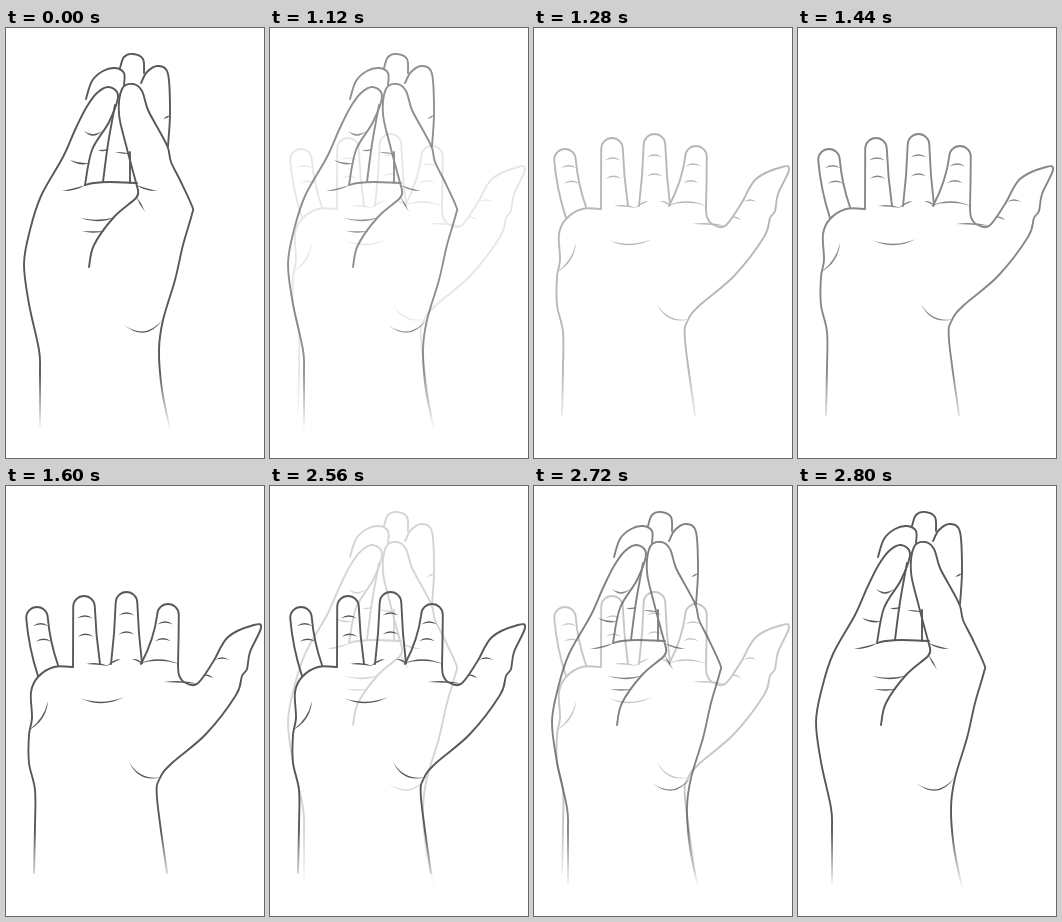
An HTML page for the animation above (2.88 s loop, 258 by 430 pixels).

```html
<!DOCTYPE html>
<html lang="en">
<head>
<meta charset="utf-8">
<title>Hand opening and closing</title>
<style>
  html, body { margin: 0; width: 100%; height: 100%; overflow: hidden; background: #fff; }
  svg { display: block; width: 100%; height: 100%; }
  .line { fill: none; stroke: url(#ink); stroke-width: 1.9; stroke-linecap: round; stroke-linejoin: round; }
  .crease { fill: #58585a; }
</style>
</head>
<body>
<svg viewBox="0 0 258 430">
  <linearGradient id="ink" gradientUnits="userSpaceOnUse" x1="0" y1="345" x2="0" y2="402">
    <stop stop-color="#58585a"/>
    <stop offset="1" stop-color="#58585a" stop-opacity="0"/>
  </linearGradient>
  <g id="closed"></g>
  <g id="open"></g>
</svg>
<script>
const LOOP = 2880, STEP = 80;
const OPENING = 1120, OPENING_STEPS = 7;
const CLOSING = 2560, CLOSING_STEPS = 4;

const closed = document.getElementById('closed');
const open = document.getElementById('open');

function addPath(hand, className, d) {
  const path = document.createElementNS('http://www.w3.org/2000/svg', 'path');
  path.setAttribute('class', className);
  path.setAttribute('d', d);
  hand.append(path);
}

// Smooth curve through a few key points
function curve(hand, text) {
  const p = text.split(' ').map(pair => pair.split(',').map(Number));
  let d = `M${p[0]}`;
  for (let i = 0; i < p.length - 1; i++) {
    const a = p[i - 1] || p[i], b = p[i], c = p[i + 1], e = p[i + 2] || c;
    const leave = b.map((v, k) => v + (c[k] - a[k]) / 6);
    const arrive = c.map((v, k) => v - (e[k] - b[k]) / 6);
    d += `C${leave} ${arrive} ${c}`;
  }
  addPath(hand, 'line', d);
}

// Skin fold, pointed at both ends; a positive bow sags downwards
function crease(hand, x0, y0, x1, y1, bow) {
  const length = Math.hypot(x1 - x0, y1 - y0);
  const nx = (y0 - y1) / length, ny = (x1 - x0) / length;
  const middle = offset => `${(x0 + x1) / 2 + nx * offset},${(y0 + y1) / 2 + ny * offset}`;
  addPath(hand, 'crease',
    `M${x0},${y0}Q${middle(2 * bow + 1.5)} ${x1},${y1}Q${middle(2 * bow - 1.5)} ${x0},${y0}Z`);
}

// Upright finger: round tip, sides spreading to the base, two folds
function finger(hand, tipX, tipY, leftX, leftY, rightX, rightY) {
  const r = 10.8, sideY = tipY + r;
  const bend = (side, baseX, baseY) => `${side + (baseX - side) * .2},${(sideY + baseY) / 2}`;
  const left = tipX - r, right = tipX + r;
  addPath(hand, 'line',
    `M${leftX},${leftY}Q${bend(left, leftX, leftY)} ${left},${sideY}` +
    `A${r},${r} 0 0 1 ${right},${sideY}Q${bend(right, rightX, rightY)} ${rightX},${rightY}`);
  for (const part of [.33, .6]) {
    const x = tipX + ((leftX + rightX) / 2 - tipX) * part;
    const y = tipY + (rightY - tipY) * part;
    crease(hand, x - 8, y, x + 8, y, -2.5);
  }
}

function drawClosedHand() {
  const line = points => curve(closed, points);
  const fold = (...shape) => crease(closed, ...shape);

  // Near finger and left side of the palm
  line('34,399 34,345 33,322 23,276 18,236 24,202 35,168 57,129 69,102 80,80 91,65 103,59 112,68 103,94 86,122 79,157');
  // Fingers behind
  line('80,71 86,53 97,43 109,40 118,45 118,57');
  line('109,77 102,116 97,154');
  line('114,40 118,29 127,26 137,31 138,45');
  line('135,55 141,44 152,38 162,46 164,85 162,118');
  // Thumb and right side of the wrist
  line('132,162 120,117 113,86 116,61 127,56 136,63 142,82 154,104 162,120 165,134 174,152 186,178 186,186 177,217 169,252 157,292 153,322 156,362 164,401');
  line('124,124 124,155');
  // Palm
  line('79,157 88,155 104,154 131,155');
  line('132,162 130,170 108,189 88,217 83,239');

  fold(56, 163, 80, 157, 1);
  fold(130, 157, 151, 163, 1);
  fold(130, 168, 139, 184, 0);
  fold(78, 103, 96, 103, 4);
  fold(64, 132, 85, 135, 2);
  fold(92, 122, 103, 121, 1);
  fold(109, 124, 125, 126, 0);
  fold(157, 91, 165, 87, 0);
  fold(74, 190, 110, 189, 3);
  fold(76, 203, 99, 203, 1);
  fold(118, 297, 157, 291, 10);
}

function drawOpenHand() {
  const line = points => curve(open, points);
  const fold = (...shape) => crease(open, ...shape);

  finger(open, 31, 121, 32, 190, 52, 179);
  finger(open, 78, 110, 67, 181, 94, 178);
  finger(open, 120.5, 106, 105, 178, 136, 177);
  finger(open, 162, 118, 135, 178, 172, 180);
  // Left side of the palm
  line('28,387 29,340 29,304 23,277 23,249 26,232 25,206 32,191 48,181 67,181');
  // Thumb and right side of the wrist
  line('172,180 173,189 178,196 191,198 207,176 222,151 248,139 255,142 244,166 241,183 236,190 230,209 200,248 166,277 154,292 151,312 161,387');

  fold(42, 215, 23, 244, -4);
  fold(80, 178, 103, 180, -1);
  fold(101, 180, 115, 173, -1);
  fold(126, 173, 137, 178, -1);
  fold(132, 178, 173, 178, -4);
  fold(158, 196, 193, 198, -1);
  fold(123, 276, 156, 291, 7);
  fold(74, 212, 118, 211, 5);
  fold(209, 174, 223, 174, -2);
  fold(197, 189, 207, 192, -1);
}

// Share of a stepped fade that is done; the first step shows at once
function progress(time, start, steps) {
  const step = Math.floor((time - start) / STEP) + 1;
  return Math.min(Math.max(step / steps, 0), 1);
}

function render(time) {
  const opened = progress(time, OPENING, OPENING_STEPS);
  const shut = progress(time, CLOSING, CLOSING_STEPS);
  const leaving = Math.max(0, 1 - opened * OPENING_STEPS / 3);
  closed.setAttribute('opacity', Math.max(leaving, shut));
  open.setAttribute('opacity', opened * Math.min(1, (1 - shut) * 4 / 3));
}

drawClosedHand();
drawOpenHand();

const began = performance.now();
function tick() {
  render((performance.now() - began) % LOOP);
  requestAnimationFrame(tick);
}
tick();
</script>
</body>
</html>
```
